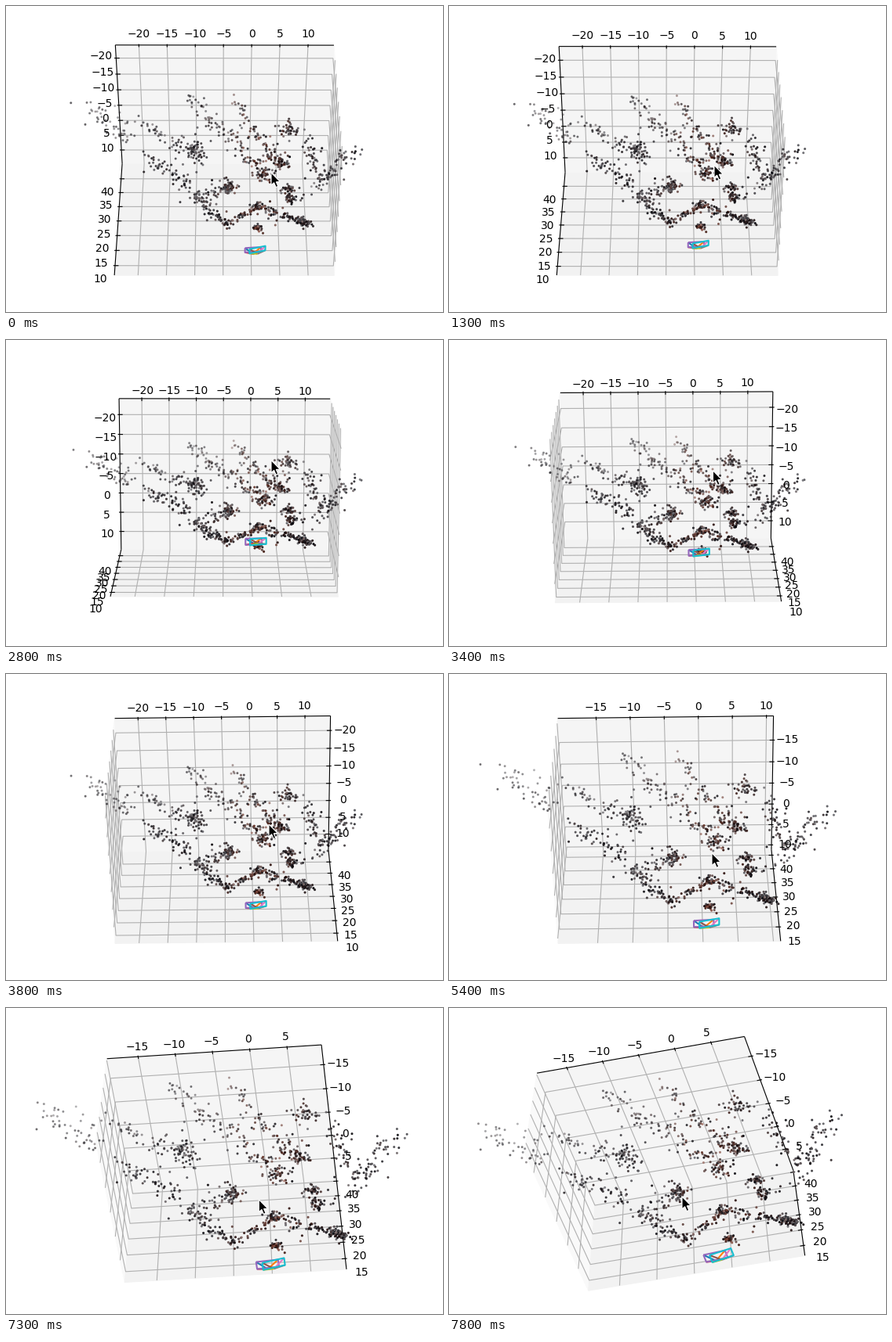
These frames come from a looping animation (557 by 391 pixels, 8000 ms). A matplotlib script:

```python
import numpy as np
import matplotlib.pyplot as plt
from matplotlib.animation import FuncAnimation
from matplotlib.collections import LineCollection
from matplotlib.patches import Polygon, Rectangle

WIDTH, HEIGHT, DPI = 557, 391, 100
STEP_MS, LOOP_MS = 100, 8000
VIEW_CENTER = np.array([278.4, 196.7])
VIEW_SCALE = np.array([2681.0, -1998.0])
DISTANCE = 10.0
SCENE_CENTER = np.array([-4.8, -4.65, 26.25])
DELTA = 1 / 12
EDGE = 0.5 + DELTA / 4
LABEL_EDGE = EDGE + 0.886 * DELTA

# Mouse drags: mode, start and end in ms, pointer travel in x and y
DRAGS = [
    ("turn", 1000, 1800, 0, -21),
    ("turn", 2000, 2400, 0, -7),
    ("turn", 2500, 3000, 0, -45),
    ("turn", 3100, 3800, -3, 52),
    ("zoom", 4900, 5700, 0, 51),
    ("zoom", 5800, 6000, 0, 3),
    ("turn", 7200, 7500, -31, -3),
    ("turn", 7600, 7800, -7, -2),
]
TURN_X, TURN_Y = 180 / 496, 180 / 369.6
ZOOM_RATE = 0.0055

# Rows of points running towards the camera, from far end to near end
ROWS = [
    [(-29.5, -12, 38.5), (-22, -6, 33)],
    [(-20, -10.8, 33.5), (-8.5, -5.5, 25.5)],
    [(-11.5, -13.7, 39), (2, -4.3, 22.7)],
    [(-3.8, -14.3, 37), (5.5, -6.2, 22)],
    [(-20, -6, 28), (-11, -2, 20)],
    [(18.5, -10, 26), (12, 0, 23)],
    [(9.5, -11, 29), (12, -2, 21)],
]
NEAR_EDGE = [(-3.2, -2.5, 19.4), (-10, 1, 19.6), (-4.5, 3.3, 12.6),
             (1.3, 0.8, 16), (9, 3.2, 13.4)]
CLUMPS = [(-10, -7.2, 28), (2, -4.3, 21.5), (5.2, -7, 23), (6.5, -11.8, 29),
          (6.4, -2.8, 18.4), (6.6, -0.6, 17.2), (-3.8, -2.4, 19.4),
          (1.2, 0.9, 16), (8.6, 2.9, 13.6), (9.7, 3.5, 13.3),
          (1, 4.3, 12.5)]


class View:
    """Camera state reached by the drags up to a time."""

    def __init__(self, time):
        self.pointer = np.array([338.0, 213.0])
        elevation, azimuth, self.span = 47.0, -0.1, 37.2
        for mode, start, end, dx, dy in DRAGS:
            progress = np.clip((time - start) / (end - start), 0, 1)
            move = np.array([dx, dy]) * (1 - (1 - progress) ** 1.3)
            self.pointer += move
            if mode == "turn":
                azimuth -= move[0] * TURN_X
                elevation -= move[1] * TURN_Y
            else:
                self.span *= np.exp(-ZOOM_RATE * move[1])
        self.azimuth, self.elevation = np.radians([azimuth, elevation])
        self.back = np.array([-1 if azimuth > 0 else 1, 1, 1]) * EDGE

    def to_box(self, points):
        return (np.asarray(points) - SCENE_CENTER) / self.span

    def project(self, box_points):
        """Return screen positions and depths of points in the unit box."""
        x, y, z = np.moveaxis(np.asarray(box_points, float), -1, 0)
        sin_a, cos_a = np.sin(self.azimuth), np.cos(self.azimuth)
        sin_e, cos_e = np.sin(self.elevation), np.cos(self.elevation)
        right = x * cos_a + y * sin_a
        inward = y * cos_a - x * sin_a
        depth = DISTANCE + inward * cos_e + z * sin_e
        plane = np.stack([right, z * cos_e - inward * sin_e], axis=-1)
        return VIEW_CENTER + VIEW_SCALE * plane / depth[..., None], depth

    def screen(self, box_points):
        return self.project(box_points)[0]

    def ticks(self, axis):
        low = SCENE_CENTER[axis] - self.span / 2
        values = np.arange(np.ceil(low / 5 - 1e-6) * 5,
                           low + self.span + 1e-6, 5)
        return [(int(v), (v - SCENE_CENTER[axis]) / self.span) for v in values]


def make_cloud():
    rng = np.random.default_rng(12)

    def along(start, end, density, skew):
        start, end = np.array(start), np.array(end)
        count = int(density * np.linalg.norm(end - start))
        return start + rng.random((count, 1)) ** skew * (end - start)

    parts = [along(*row, density=4.6, skew=0.75) for row in ROWS]
    parts += [along(*ends, density=7.5, skew=1)
              for ends in zip(NEAR_EDGE, NEAR_EDGE[1:])]
    parts += [np.tile(clump, (36, 1)) for clump in CLUMPS]
    cloud = np.vstack(parts)

    # Noise grows with the distance from the camera
    spread = np.clip(0.055 * (cloud[:, 2:] - 6), 0.3, 0.85)
    stray = np.where(rng.random((len(cloud), 1)) < 0.18, 1.9, 0.9)
    cloud = cloud + rng.normal(size=cloud.shape) * spread * stray

    shade = 0.03 + 0.4 * rng.random(len(cloud)) ** 1.5
    central = np.exp(-((cloud[:, 0] - 1) / 6) ** 2)
    warmth = rng.random(len(cloud)) ** 2 * (0.06 + 0.22 * central)
    colors = np.column_stack([shade + warmth, shade + 0.25 * warmth,
                              shade + 0.02, np.ones(len(cloud))])
    return cloud, colors


def make_cameras():
    """Two wire pyramids: four spokes and one frame each."""
    paths = []
    for x, yaw in ((0.05, 0.15), (0.8, 0.5)):
        apex = np.array([x, 0.1, 0])
        corners = [(x + 1.35 * sx, 0.72 * sy, 1.2 + yaw * sx)
                   for sx, sy in ((-1, -1), (1, -1), (1, 1), (-1, 1))]
        paths += [np.array([apex, corner]) for corner in corners]
        paths.append(np.array(corners + corners[:1]))
    return paths


def moved(point, axis, value):
    result = np.array(point, float)
    result[axis] = value
    return result


def pane(view, axis):
    u, v = (i for i in range(3) if i != axis)
    corners = [moved(moved(view.back, u, a * EDGE), v, b * EDGE)
               for a, b in ((-1, -1), (1, -1), (1, 1), (-1, 1))]
    return view.screen(corners)


def axis_parts(view, axis):
    """Grid lines, black lines and labels of one axis."""
    side = 1 if axis == 0 else 0
    edge = moved(view.back, side, -view.back[side])
    inward = np.sign(view.back[side]) * DELTA
    grid, labels = [], []
    black = [view.screen([moved(edge, axis, -EDGE), moved(edge, axis, EDGE)])]
    for value, place in view.ticks(axis):
        corner = moved(view.back, axis, place)
        ends = [moved(corner, i, -corner[i])
                for i in ((axis + 1) % 3, (axis + 2) % 3)]
        grid.append(view.screen([ends[0], corner, ends[1]]))
        base = moved(edge, axis, place)
        black.append(view.screen([moved(base, side, base[side] + s * inward)
                                  for s in (0.2, -0.1)]))
        anchor = moved(np.sign(edge) * LABEL_EDGE, axis, place)
        labels.append((str(value).replace("-", "\u2212"), view.screen(anchor)))
    return grid, black, labels


cloud, cloud_colors = make_cloud()
cameras = make_cameras()
arrow = np.array([(0, 0), (0, 16), (3.6, 12.7), (6.1, 18.6), (8.8, 17.4),
                  (6.3, 11.8), (11.3, 11.5)])

fig = plt.figure(figsize=(WIDTH / DPI, HEIGHT / DPI), dpi=DPI,
                 facecolor="white")
ax = fig.add_axes([0, 0, 1, 1])
ax.axis("off")

panes = [ax.add_patch(Polygon(np.zeros((4, 2)), color=gray, lw=0.8, zorder=1))
         for gray in ("0.975", "0.95", "0.9625")]
grid_lines = LineCollection([], colors="#b0b0b0", linewidths=0.8, zorder=2)
black_lines = LineCollection([], colors="black", linewidths=0.8, zorder=3)
camera_lines = LineCollection([], colors=[f"C{i}" for i in range(10)],
                              linewidths=1.5, zorder=5)
for lines in (grid_lines, black_lines, camera_lines):
    ax.add_collection(lines, autolim=False)
dots = ax.scatter(cloud[:, 0], cloud[:, 1], s=2, linewidths=0.8, zorder=4)
dots.set_clip_path(Rectangle((23.8, 16.6), 496, 369.6,
                             transform=ax.transData))
texts = [ax.text(0, 0, "", fontsize=10, family="DejaVu Sans", ha="center",
                 va="top", zorder=6) for _ in range(30)]
pointer = ax.add_patch(Polygon(arrow, facecolor="black", edgecolor="white",
                               lw=0.8, zorder=7))
ax.set(xlim=(0, WIDTH), ylim=(HEIGHT, 0))


def draw(frame):
    view = View(frame * STEP_MS)
    grid, black, labels = [], [], []
    for axis in range(3):
        panes[axis].set_xy(pane(view, axis))
        for whole, part in zip((grid, black, labels), axis_parts(view, axis)):
            whole.extend(part)
    grid_lines.set_segments(grid)
    black_lines.set_segments(black)
    camera_lines.set_segments([view.screen(view.to_box(p)) for p in cameras])

    places, depth = view.project(view.to_box(cloud))
    colors = cloud_colors.copy()
    colors[:, 3] = 1 - 0.7 * (depth - depth.min()) / np.ptp(depth)
    order = np.argsort(-depth)
    dots.set_offsets(places[order])
    dots.set_color(colors[order])

    for i, text in enumerate(texts):
        label, place = labels[i] if i < len(labels) else ("", (0, 0))
        text.set_text(label)
        text.set_position(place)
    pointer.set_xy(arrow + view.pointer)
    return []


anim = FuncAnimation(fig, draw, frames=LOOP_MS // STEP_MS, interval=STEP_MS,
                     repeat=True, repeat_delay=0)
plt.show()
```
